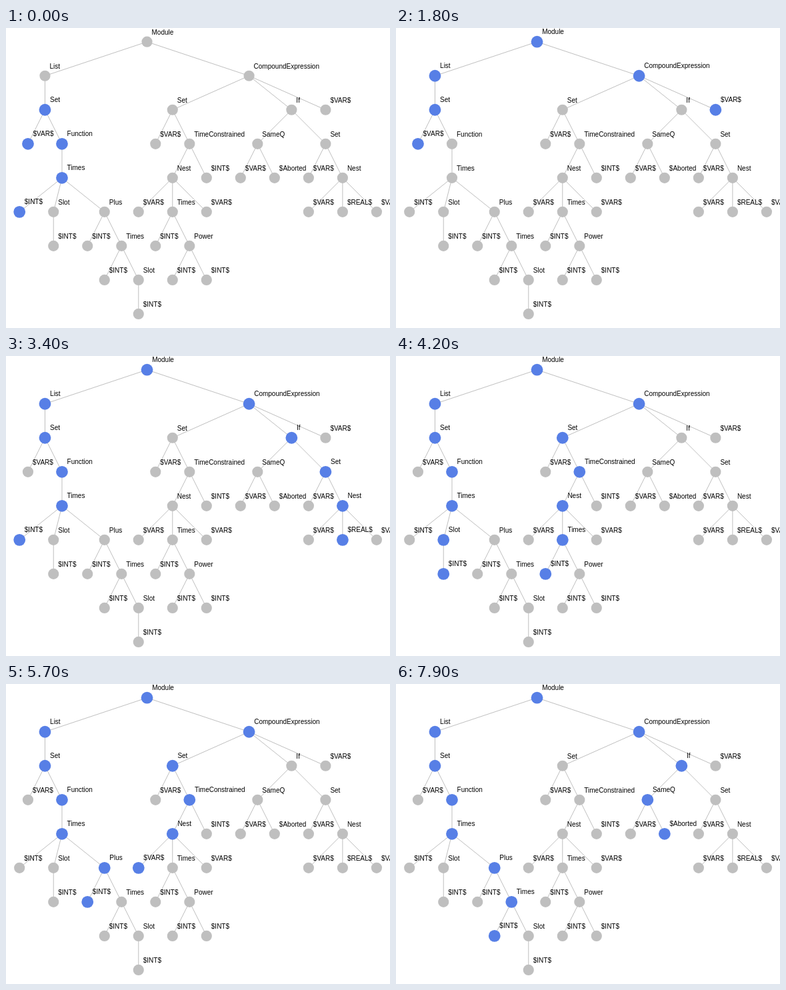
Write an HTML page with a canvas that moves like this. It is 576 px wide and 450 px high and loops after 8 s.

```html
<!DOCTYPE html>
<html>
<head>
<meta charset="utf-8">
<style>
html, body { margin: 0; width: 100%; height: 100%; overflow: hidden; background: #fff; }
canvas { display: block; }
</style>
</head>
<body>
<canvas id="stage" width="576" height="450"></canvas>
<script>
// Tree in preorder: depth, column, label
const nodes = `0 7.5 Module
1 1.5 List
2 1.5 Set
3 .5 $VAR$
3 2.5 Function
4 2.5 Times
5 0 $INT$
5 2 Slot
6 2 $INT$
5 5 Plus
6 4 $INT$
6 6 Times
7 5 $INT$
7 7 Slot
8 7 $INT$
1 13.5 CompoundExpression
2 9 Set
3 8 $VAR$
3 10 TimeConstrained
4 9 Nest
5 7 $VAR$
5 9 Times
6 8 $INT$
6 10 Power
7 9 $INT$
7 11 $INT$
5 11 $VAR$
4 11 $INT$
2 16 If
3 14 SameQ
4 13 $VAR$
4 15 $Aborted
3 18 Set
4 17 $VAR$
4 19 Nest
5 17 $VAR$
5 19 $REAL$
5 21 $VAR$
2 18 $VAR$`.split('\n').map(line => {
  const [depth, col, label] = line.split(' ');
  return { depth: +depth, x: 20.2 + 25.51 * col, y: 20.7 + 51.03 * depth, label };
});

const latest = [];
for (const node of nodes) {
  node.parent = latest[node.depth - 1];
  latest[node.depth] = node;
}
const leaves = nodes.filter(n => !nodes.some(m => m.parent === n));
const pairs = leaves.flatMap((a, i) => leaves.slice(i + 1).map(b => [a, b]));

// All nodes between two leaves, including their common ancestor
function pathBetween(a, b) {
  const path = new Set();
  while (a !== b) {
    if (a.depth >= b.depth) { path.add(a); a = a.parent; }
    else { path.add(b); b = b.parent; }
  }
  return path.add(a);
}

const STEP = 100, LOOP = 8000;
const ctx = document.getElementById('stage').getContext('2d');
ctx.font = '10px "Liberation Sans", Arial, sans-serif';

function draw(now) {
  const path = pathBetween(...pairs[Math.floor(now % LOOP / STEP)]);
  ctx.fillStyle = '#fff';
  ctx.fillRect(0, 0, 576, 450);

  ctx.strokeStyle = '#bfbfbf';
  ctx.lineWidth = 1;
  ctx.beginPath();
  for (const { x, y, parent } of nodes) {
    if (!parent) continue;
    ctx.moveTo(parent.x, parent.y);
    ctx.lineTo(x, y);
  }
  ctx.stroke();

  for (const node of nodes) {
    const on = path.has(node);
    ctx.fillStyle = on ? '#577fe6' : '#bfbfbf';
    ctx.beginPath();
    ctx.arc(node.x, node.y, on ? 8.9 : 8.1, 0, 2 * Math.PI);
    ctx.fill();
  }

  ctx.fillStyle = '#000';
  for (const node of nodes) {
    const gap = path.has(node) ? 7.6 : 7;
    ctx.fillText(node.label, node.x + gap, node.y - gap - 4.2);
  }
}

const start = performance.now();
function tick() {
  draw(performance.now() - start);
  requestAnimationFrame(tick);
}
tick();
</script>
</body>
</html>
```
